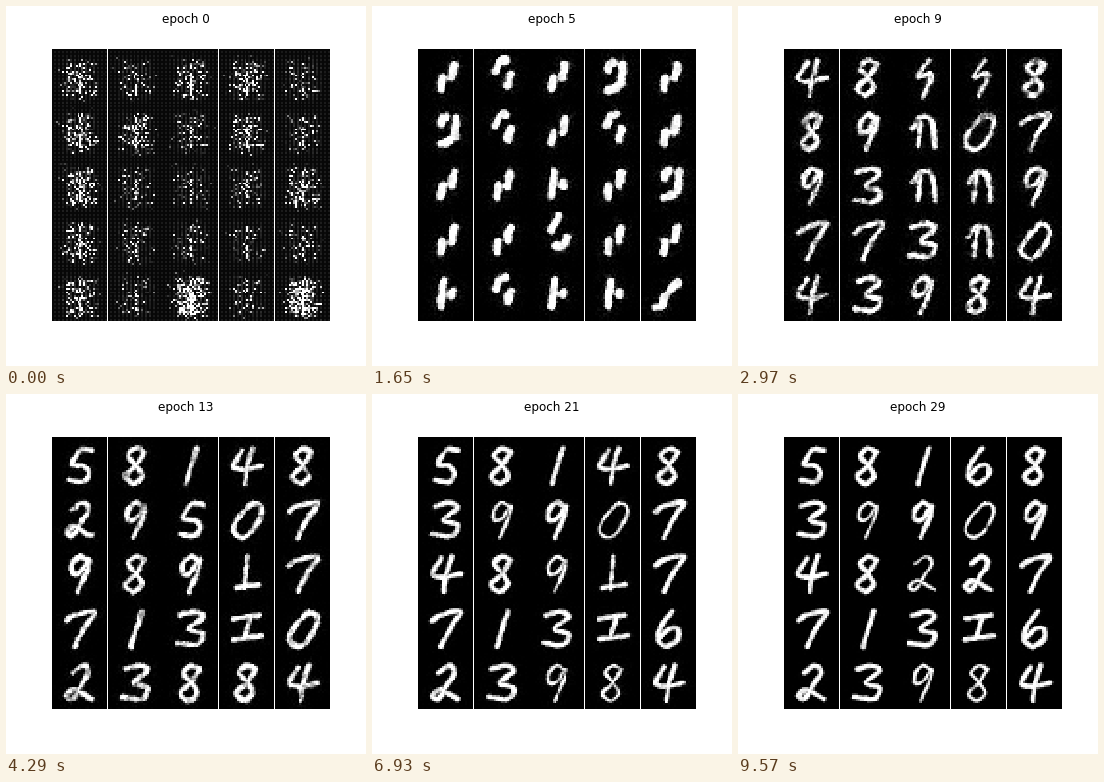
A matplotlib script that plays this animation: 360 px wide and 360 px high, repeating every 9900 ms.

```python
import numpy as np
import matplotlib.pyplot as plt
from matplotlib.animation import FuncAnimation

N = 28
EPOCHS = 30
INTERVAL = 330

# Key points of each stroke, ten units wide and high, y down.
GLYPHS = {
    "0": [[(7, 0), (2, 4), (0, 8), (3, 10), (7, 8), (10, 3), (9, .5), (6, .5)]],
    "1": [[(7, 0), (5, 5), (3, 10)]],
    "2": [[(2, 2), (6, 0), (8, 2), (5, 6), (2, 9.5), (0, 8.5), (3, 7), (9, 9.5)]],
    "3": [[(1, 1), (6, 0), (9, 1.5), (4, 5), (9, 6.5), (7, 9.5), (0, 9)]],
    "4": [[(3, .5), (0, 5), (4, 6), (10, 5)], [(7, 0), (5, 5), (4, 10)]],
    "5": [[(9, .5), (5, .5), (2, 4.5), (6, 5), (8, 7), (6, 9.5), (1, 9)]],
    "6": [[(6, 0), (2, 4), (1, 8), (4, 10), (8, 8), (8, 5), (5, 5), (1, 8)]],
    "7": [[(0, 2.5), (3, 1), (10, 0), (7, 4), (3, 10)]],
    "8": [[(8, 1), (5, 0), (2, 2), (5, 5), (7, 8), (4, 10), (1, 8), (5, 4.8), (8, 1)]],
    "9": [[(8, 1.5), (5, 0), (2, 2), (2, 5), (5, 4.5), (8, 1), (7, 5), (4, 10)]],
    "i": [[(0, 2), (9, 1)], [(6, 2), (4, 7)], [(0, 8), (10, 7)]],
    "l": [[(5, 0), (4, 9)], [(1, 9), (9, 8)]],
    "n": [[(1, 4), (4, 1), (8, 2), (9, 9)], [(4, 2), (3, 9)]],
    "z": [[(7, 0), (3, 4.5), (8, 4), (5, 10)]],
    # early blobs
    "P": [[(3.6, 5), (3, 8)], [(7.8, 1.2), (7, 5)]],
    "B": [[(6, 0), (4, .5), (2.5, 3)], [(8, 4), (7, 7)]],
    "D": [[(3, 2.5), (3.5, 1.2), (5, .6)], [(8.5, 1), (8, 6.5)], [(3, 8.5), (6.5, 7.5)]],
    "Q": [[(5.5, -2), (2.8, 1.8)], [(8.5, 4), (7, 6.5), (4.5, 6)]],
    "S": [[(4, 1), (3, 8)], [(7.3, 4), (7, 5)]],
    "U": [[(7.8, 1.5), (6, 3), (3, 6), (2.4, 8), (0, 8.5)]],
}

# What each cell shows at chosen epochs, row by row.
KEYS = {
    5: "PBPDP DBPBP PPSPD PPQPP SBSSU",
    9: "48zz8 89n07 93nn9 773n0 43984",
    13: "58148 29507 989l7 713i0 23884",
    17: "58148 39907 989l7 213i0 23984",
    21: "58148 39907 489l7 713i6 23984",
    29: "58168 39909 48227 713i6 23984",
}
THIN = {6, 8, 12, 22, 23}
BRIGHT = {0, 2, 3, 5, 6, 8, 10, 14, 15, 20}
FULL = {22, 24}

Y, X = np.mgrid[:N, :N] + .0
stops = sorted(KEYS)
shared = np.random.default_rng(4).random((N, N))


def smooth_path(points, steps=12):
    """Catmull-Rom curve through the points."""
    p = np.array(points, float)
    p = np.vstack([2 * p[0] - p[1], p, 2 * p[-1] - p[-2]])
    t = np.linspace(0, 1, steps)[:, None]
    parts = []
    for a, b, c, d in zip(p, p[1:], p[2:], p[3:]):
        parts.append(.5 * (2 * b + (c - a) * t + (2 * a - 5 * b + 4 * c - d) * t**2
                           + (3 * b - a - 3 * c + d) * t**3))
    return np.vstack(parts)


def distance(strokes):
    """Distance of every pixel from the strokes, centred in the cell."""
    path = np.vstack([smooth_path(s) for s in strokes])
    px = 14 + 1.45 * (path[:, 0] - 5)
    py = 14.3 + 1.8 * (path[:, 1] - 5)
    return np.hypot(X[..., None] - px, Y[..., None] - py).min(axis=2)


DIST = {name: distance(strokes) for name, strokes in GLYPHS.items()}


def soft_noise(rng):
    """Smooth random field around zero."""
    a = rng.random((N, N))
    for axis in (0, 1):
        a = (np.roll(a, 1, axis) + a + np.roll(a, -1, axis)) / 3
    return a - .5


def ease(t):
    return t * t * (3 - 2 * t)


def static(cell):
    """Dots around the middle over a faint lattice."""
    rng = np.random.default_rng(100 + cell)
    u = .5 * shared + .5 * rng.random((N, N))
    level = .56 if cell in FULL else .42 if cell in BRIGHT else .28
    spread = np.exp(-np.abs((X - 13.5) / 10)**4 - np.abs((Y - 15) / 11.5)**6)
    cut = (level + .1 * (Y % 2) - .05 + .2 * (X == 14)) * spread
    dots = np.clip((cut - u) * 6 + .2, 0, 1) * (spread > .05)
    lattice = .03 + .07 * (X % 2) * (Y % 2) + .15 * spread * (X % 2) * shared
    return np.maximum(dots, lattice)


def ink(name, cell, epoch, noise):
    """Rough, patchy strokes that grow clean with training."""
    half = .8 if cell in THIN and epoch > 13 else 1.25
    if name.isupper():
        half = 2.1
    rough = np.interp(epoch, [5, 9, 17, 29], [3, 3, 2, 1.5])
    return np.clip(half + .55 - DIST[name] + rough * noise, 0, 1)


def picture(epoch, cell):
    rng = np.random.default_rng([epoch, cell])
    nxt = next(k for k in stops if k >= epoch)
    prev = max([k for k in stops if k <= epoch], default=nxt)
    t = ease((epoch - prev) / (nxt - prev)) if nxt > prev else 0
    a, b = (KEYS[k].replace(" ", "")[cell] for k in (prev, nxt))
    noise = soft_noise(rng)
    img = (1 - t) * ink(a, cell, epoch, noise) + t * ink(b, cell, epoch, noise)

    fade = np.interp(epoch, [5, 9, 17, 29], [.2, 1, .5, .2])
    img = img * np.clip(1 + 3 * fade * (soft_noise(rng) + .03), 0, 1)
    halo = np.interp(epoch, [0, 5, 9, 13, 29], [.8, .6, .35, .2, .05])
    near = np.exp(-((1 - t) * DIST[a] + t * DIST[b]) / 2.5)
    img = np.maximum(img, rng.random((N, N))**4 * near * halo)
    if epoch < 5:
        t = epoch / 5
        img = np.clip(ease(t) * img + (1 - t)**1.3 * static(cell), 0, 1)
    return img


fig, axes = plt.subplots(
    5, 5, figsize=(5, 5), dpi=72,
    gridspec_kw=dict(left=.125, right=.9, bottom=.125, top=.88, wspace=0, hspace=0))
fig.patch.set_facecolor("white")
title = fig.suptitle("epoch 0", fontsize=12, fontfamily="DejaVu Sans")
views = []
for ax in axes.flat:
    ax.axis("off")
    views.append(ax.imshow(np.zeros((N, N)), cmap="gray", vmin=0, vmax=1,
                           interpolation="nearest"))


def draw(epoch):
    title.set_text(f"epoch {epoch}")
    for cell, view in enumerate(views):
        view.set_data(picture(epoch, cell))
    return [title, *views]


anim = FuncAnimation(fig, draw, frames=EPOCHS, interval=INTERVAL, repeat=True,
                     repeat_delay=0, blit=False)
plt.show()
```
